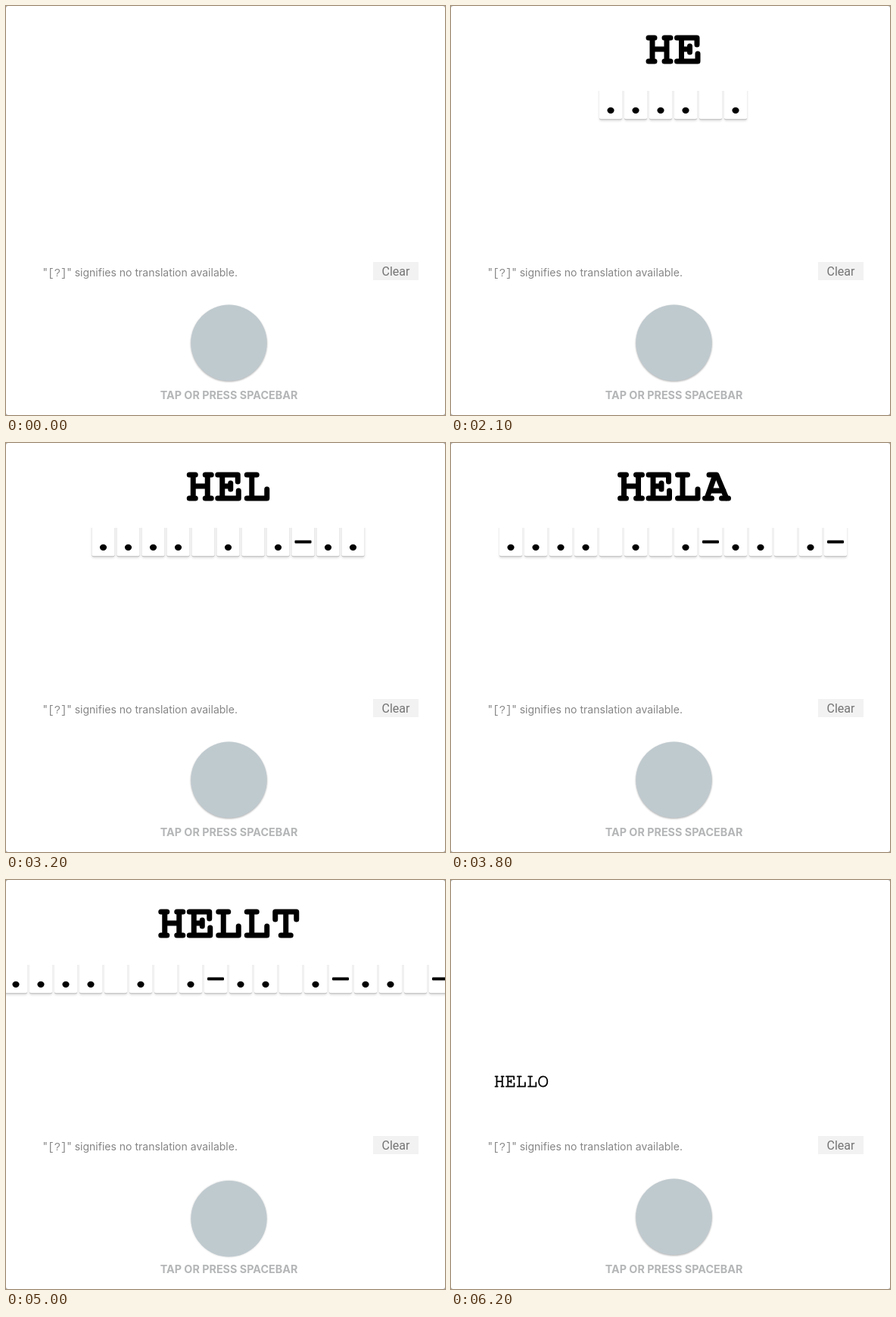
Animation of 580 by 540 pixels, one loop 8 s. Source, as an HTML page:

```html
<!DOCTYPE html>
<html lang="en">
<head>
<meta charset="utf-8">
<title>Morse key</title>
<style>
  html, body { margin: 0; width: 100%; height: 100%; overflow: hidden; background: #a4a4a4; }
  svg { display: block; }
  .glyphs { fill: none; stroke: #000; stroke-linecap: round; stroke-linejoin: round; }
  .glyphs path { vector-effect: non-scaling-stroke; }
  .tile { fill: #fff; filter: drop-shadow(0 1px .7px rgba(0,0,0,.16)) drop-shadow(0 2px 1.5px rgba(0,0,0,.16)); }
  .note { font: 14.02px Inter, sans-serif; fill: #868686; }
  .mono { font: 14px "Liberation Mono", monospace; }
  .clear { font: 16px Roboto, sans-serif; fill: #747474; }
  .hint { font: 700 14.35px Inter, sans-serif; fill: #b4b6b7; }
</style>
</head>
<body>
<svg width="580" height="540" viewBox="0 0 580 540">
  <defs><clipPath id="strip"><rect y="112" width="580" height="60"/></clipPath></defs>
  <rect width="580" height="540" rx="3" fill="#fff"/>
  <g id="word" class="glyphs" stroke-width="7" role="img"></g>
  <g id="tiles" clip-path="url(#strip)"></g>
  <g id="result" class="glyphs" stroke-width="1.8" role="img"></g>
  <text class="note" y="356.5"><tspan x="48.6">"</tspan><tspan class="mono" x="55.3">[?]</tspan><tspan x="80.3">"</tspan><tspan x="90.7">signifies no translation available.</tspan></text>
  <rect x="485" y="338" width="60" height="24" fill="#f2f2f2"/>
  <text class="clear" x="515" y="355.7" text-anchor="middle">Clear</text>
  <circle id="key" cx="294.5" r="50.2" fill="#bfcacf"/>
  <text class="hint" x="294.5" y="518.5" text-anchor="middle">TAP OR PRESS SPACEBAR</text>
</svg>
<script>
const LOOP = 8000, TICK = 100, CLEARED = 6200;
const PITCH = 33, CELL = 37.5, MID = 294;
const $ = id => document.getElementById(id);

const MORSE = {
  ".": "E", "..": "I", "...": "S", "....": "H", ".-": "A",
  ".-.": "R", ".-..": "L", "-": "T", "--": "M", "---": "O"
};

// Slab typewriter letters as pen strokes, baseline at y 31
const GLYPHS = {
  H: "M4 0H12M25 0H33M4 31H12M25 31H33M9 0V31M28 0V31M9 15H28",
  E: "M4 0H30.5V9M4 31H31.5V21M10 0V31M10 15H21M21 11V19",
  A: "M9 0H19L32 31M17 0L6 31M3.5 31H12.5M25.5 31H34.5M10 21H28",
  L: "M5 0H18M11.5 0V31M5 31H31.5V19",
  T: "M5 10V0H33V10M19 0V31M12.5 31H25.5",
  R: "M4 0H20C32 0 32 16 20 16H10M10 0V31M4 31H14M20 16C25 19 27 31 34 31",
  I: "M7 0H31M19 0V31M7 31H31",
  S: "M30 9V1M30 8C26 -3 7 -2 7 8C7 18 31 13 31 23C31 34 9 34 7 23M7 22V30",
  M: "M3 0H9L18.5 17L28 0H34M8 0V31M29 0V31M3 31H12M25 31H34",
  O: "M18.5 0C38 0 38 31 18.5 31C-1 31 -1 0 18.5 0Z"
};

// code, first release, ms between releases, key depth in the ticks around release
const LETTERS = [
  ["....", 700, 200, { 1: 1 }],
  [".", 2000, 200, { 1: .5, 0: .25 }],
  [".-..", 2600, 200, { 1: 1 }],
  [".-..", 3600, 200, { 1: 1 }],
  ["---", 4800, 300, { 2: .5, 1: 1 }]
];

function stateAt(t) {
  const typed = [];
  let depth = 0;
  for (const [code, start, step, press] of LETTERS) {
    let done = "";
    [...code].forEach((sign, i) => {
      const release = start + i * step;
      if (t >= release) done += sign;
      if (t >= 700) depth = Math.max(depth, press[(release - t) / TICK] || 0);
    });
    if (done) typed.push(done);
  }
  return { typed, depth };
}

function letters(text, x, y, sx, sy) {
  return [...text].map((c, i) =>
    `<path transform="translate(${x + i * CELL * sx} ${y}) scale(${sx} ${sy})" d="${GLYPHS[c]}"/>`).join("");
}

function tile(sign, x) {
  const mark = sign === "." ? `<ellipse cx="${x + 16}" cy="137.8" rx="4.6" ry="4.1"/>`
    : sign === "-" ? `<rect x="${x + 5}" y="128.4" width="22" height="4" rx="1.2"/>` : "";
  return `<rect class="tile" x="${x + 1}" y="100" width="30" height="49.3" rx="2"/>${mark}`;
}

function drawKey(depth) {
  $("key").setAttribute("cy", 444.8 + 2.5 * depth);
  $("key").style.filter =
    `drop-shadow(0 ${1.6 * (1 - depth)}px ${1.2}px rgba(0,0,0,${.32 - .14 * depth}))`;
}

function draw(t) {
  const { typed, depth } = stateAt(t);
  const word = typed.map(code => MORSE[code]).join("");
  const signs = [...typed.join(" ")];
  const open = t < CLEARED;
  const left = MID - signs.length * PITCH / 2;
  $("word").innerHTML = open ? letters(word, MID + .5 - word.length * CELL / 2, 42, 1, 1) : "";
  $("tiles").innerHTML = open ? signs.map((s, i) => tile(s, left + i * PITCH)).join("") : "";
  $("result").innerHTML = open ? "" : letters(word, 57, 259.3, .384, .432);
  $("word").setAttribute("aria-label", open ? word : "");
  $("result").setAttribute("aria-label", open ? "" : word);
  drawKey(depth);
}

let shown = -1;
function frame() {
  const t = Math.floor(performance.now() % LOOP / TICK) * TICK;
  if (t !== shown) draw(shown = t);
  requestAnimationFrame(frame);
}
frame();
</script>
</body>
</html>
```
